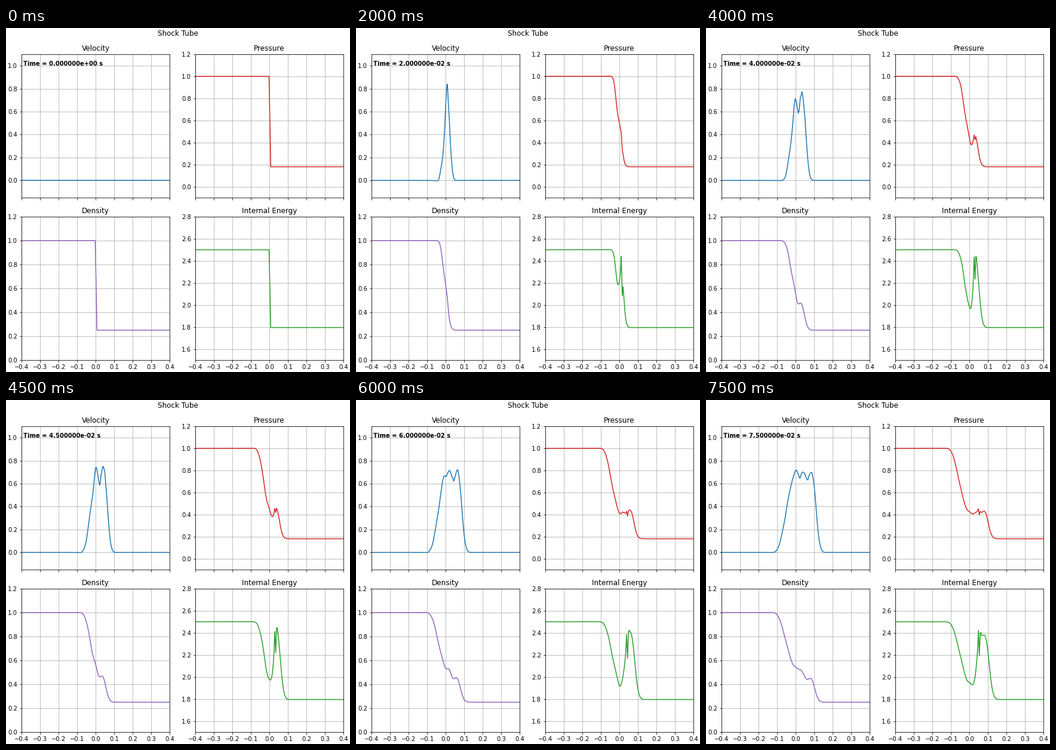
Animation, 576 px wide and 576 px high, one loop 8 s. Source, as a matplotlib script:

```python
import numpy as np
import matplotlib.pyplot as plt
from matplotlib.animation import FuncAnimation

SIZE, DPI = 576, 72
FRAMES, INTERVAL = 16, 500

# Smoothed particle hydrodynamics of a gas shock tube
DT = 0.005
GAMMA = 1.4
H = 0.015
MASS = 0.001875
ALPHA, BETA, ETA = 1.0, 1.0, 0.1


def initial_state():
    left = -0.6 + MASS * np.arange(320)
    right = 4 * MASS * np.arange(1, 81)
    x = np.concatenate([left, right])
    inside = x < 0
    rho = np.where(inside, 1.0, 0.25)
    u = np.where(inside, 2.5, 1.795)
    return x, np.zeros_like(x), rho, u


def kernel(dx):
    """Cubic spline and its derivative."""
    q = np.abs(dx) / H
    near, tail = q <= 1, np.clip(2 - q, 0, None)
    w = np.where(near, 2 / 3 - q**2 + q**3 / 2, tail**3 / 6) / H
    slope = np.where(near, -2 * q + 1.5 * q**2, -tail**2 / 2) / H**2
    return w, slope * np.sign(dx)


def pair_mean(a):
    return 0.5 * (a[:, None] + a[None, :])


def rates(x, v, u):
    dx = x[:, None] - x[None, :]
    dv = v[:, None] - v[None, :]
    w, dw = kernel(dx)
    rho = MASS * w.sum(axis=1)
    p = (GAMMA - 1) * rho * u
    c = np.sqrt((GAMMA - 1) * u)

    # artificial viscosity acts on approaching pairs only
    mu = H * np.minimum(dv * dx, 0) / (dx**2 + (ETA * H)**2)
    visc = (BETA * mu - ALPHA * pair_mean(c)) * mu / pair_mean(rho)

    force = MASS * (2 * pair_mean(p / rho**2) + visc) * dw
    return rho, p, -force.sum(axis=1), 0.5 * (force * dv).sum(axis=1)


def simulate():
    x, v, rho, u = initial_state()
    states = [(x, v, (GAMMA - 1) * rho * u, rho, u)]
    acc = du = np.zeros_like(x)
    for step in range(1, FRAMES):
        # leapfrog: predict half a step, then advance
        rho, p, acc, du = rates(x, v + DT / 2 * acc, u + DT / 2 * du)
        dt = DT / 2 if step == 1 else DT
        v = v + dt * acc
        u = u + dt * du
        x = x + DT * v
        states.append((x, v, p, rho, u))
    return states


STATES = simulate()

# title, left, bottom, y limits, y ticks, colour
PANELS = [
    ("Velocity", 26, 292, (-0.15, 1.1), np.arange(6) * 0.2, "tab:blue"),
    ("Pressure", 317, 292, (-0.1, 1.2), np.arange(7) * 0.2, "tab:red"),
    ("Density", 26, 20, (0.0, 1.2), np.arange(7) * 0.2, "tab:purple"),
    ("Internal Energy", 317, 20, (1.5, 2.8), 1.6 + np.arange(7) * 0.2, "tab:green"),
]

plt.rcParams["font.family"] = "DejaVu Sans"
fig = plt.figure(figsize=(SIZE / DPI, SIZE / DPI), dpi=DPI, facecolor="white")
fig.suptitle("Shock Tube", y=1 - 3 / SIZE, fontsize=12)


def add_panel(title, left, bottom, ylim, yticks, color):
    ax = fig.add_axes([left / SIZE, bottom / SIZE, 248 / SIZE, 240 / SIZE])
    ax.set_title(title, fontsize=12)
    ax.set_xticks(np.arange(-4, 5) / 10)
    ax.set_yticks(np.round(yticks, 1))
    ax.set_xlim(-0.4, 0.4)
    ax.set_ylim(*ylim)
    ax.tick_params(labelsize=10, labelbottom=bottom < 100)
    ax.grid(True)
    line, = ax.plot([], [], color=color, lw=1.5)
    return ax, line


axes, lines = zip(*(add_panel(*panel) for panel in PANELS))
clock = axes[0].text(-0.39, 1.0, "", fontsize=10, weight="bold")


def update(i):
    x, *fields = STATES[i]
    for line, y in zip(lines, fields):
        line.set_data(x, y)
    clock.set_text(f"Time = {i * DT:e} s")
    return (*lines, clock)


anim = FuncAnimation(fig, update, frames=FRAMES, interval=INTERVAL,
                     repeat=True, repeat_delay=0)
plt.show()
```
